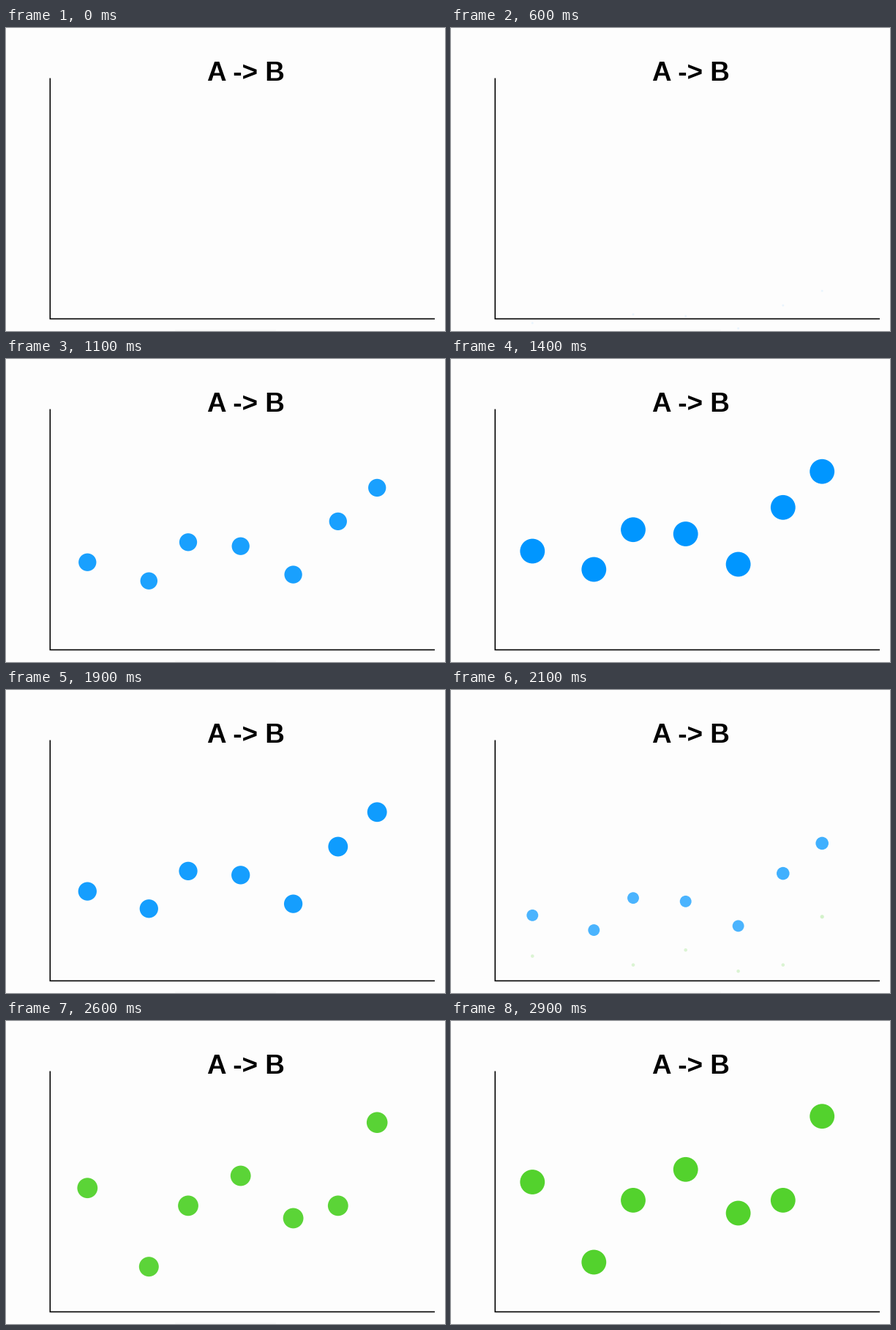
A matplotlib script for the animation above (3300 ms loop, 600x414 px).

```python
import matplotlib.pyplot as plt
from matplotlib.animation import FuncAnimation
from matplotlib.patches import Circle

W, H, DPI = 600, 414, 72
STEP, LOOP = 100, 3300          # ms
SINK = 498.5                    # y that hidden dots move towards
RADIUS = 16.9
BLUE, GREEN = "#0096ff", "#53d22d"

# Each dot: x, resting y in blue, resting y in green
DOTS = [(111.3, 262.5, 220), (195.3, 287.5, 329.5), (249, 233.2, 244.9),
        (320.7, 239, 202.8), (392.6, 280.5, 262.5), (453.8, 202.8, 244.9),
        (507.2, 153.7, 130.2)]

fig = plt.figure(figsize=(W / DPI, H / DPI), dpi=DPI, facecolor="#fdfdfd")
ax = fig.add_axes([0, 0, 1, 1])
ax.set_xlim(0, W)
ax.set_ylim(H, 0)
ax.axis("off")

ax.plot([232, 368], [413, 413], color="#f7f7f7", lw=1.5)
ax.plot([60.3, 60.3, 586], [68.5, 397.4, 397.4], color="black", lw=1.6,
        solid_capstyle="butt", solid_joinstyle="miter", snap=False)
ax.text(275, 71.5, "A -> B", family="Liberation Sans", weight="bold",
        size=36.8, color="black", ha="left", va="baseline")


def make_dots(color, z):
    return [ax.add_patch(Circle((0, H), 0, fc=color, lw=0, zorder=z))
            for _ in DOTS]


blue_dots = make_dots(BLUE, 3)
green_dots = make_dots(GREEN, 4)


def entering(t, end, duration, y):
    """1 to 0 while a dot rises; low dots arrive late, high ones early."""
    lag = 18 * round((y - 213) / 145)
    return (end + lag - t) / duration


def leaving(t, start, duration, y):
    """0 to 1 while a dot sinks; high dots set off late."""
    lag = 35 * round((288 - y) / 135)
    return (t - start - lag) / duration


def place(dot, x, y, q):
    """Draw a dot; q is 0 at rest and 1 when fully hidden."""
    q = 0 if q < 0.03 else min(q, 1)
    scale = max(0, 1 - q * (0.84 + 1.37 * q - 1.2 * q * q))
    dot.center = x, y + (SINK - y) * q ** 2
    dot.radius = RADIUS * scale
    dot.set_alpha(max(0, 1 - 1.55 * q ** 2))


def update(frame):
    t = frame * STEP
    for (x, yb, yg), blue, green in zip(DOTS, blue_dots, green_dots):
        place(blue, x, yb, max(entering(t, 1345, 965, yb),
                               leaving(t, 1677, 965, yb)))
        place(green, x, yg, entering(t, 2757, 915, yg))
    return blue_dots + green_dots


anim = FuncAnimation(fig, update, frames=LOOP // STEP, interval=STEP,
                     init_func=lambda: update(0), repeat=True,
                     repeat_delay=0, blit=False)
plt.show()
```
